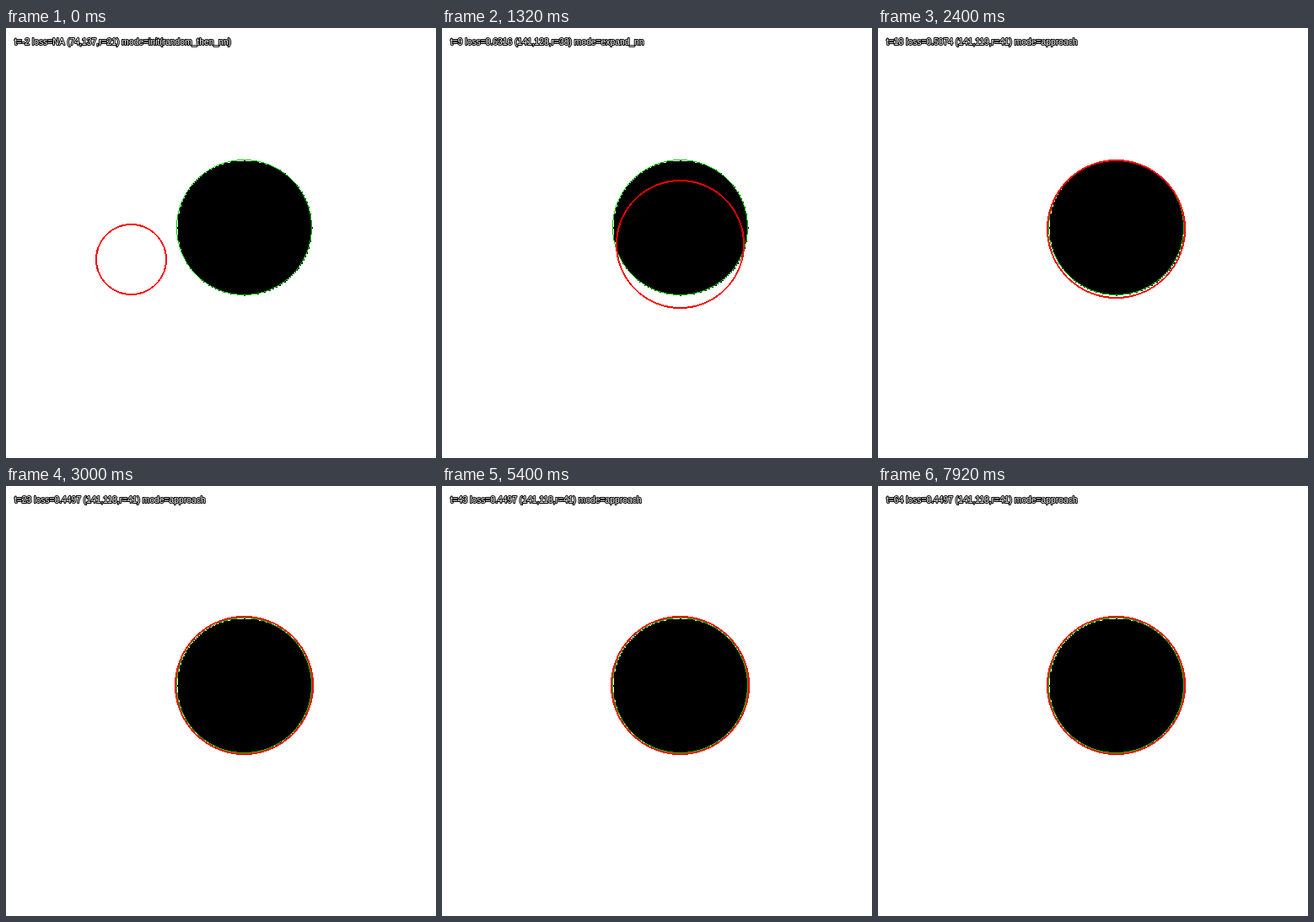
Recreate the animation shown at these times as an HTML page with a canvas. Size 510x510 px, loop 8000 ms.

```html
<!DOCTYPE html>
<html lang="en">
<head>
<meta charset="utf-8">
<title>Circle fitting</title>
<style>
  html, body { margin: 0; width: 100%; height: 100%; overflow: hidden; background: #fff; }
  canvas { display: block; width: 510px; height: 510px; }
</style>
</head>
<body>
<canvas id="stage" width="510" height="510"></canvas>
<script>
const ctx = document.getElementById('stage').getContext('2d');
const STEP = 120, LOOP = 8000, SCALE = 2;
const goal = { x: 141, y: 118, r: 40 };

// step, centre x, centre y, radius, loss
const path = [
  [-2, 74, 137, 21, 0.95],
  [4, 138, 133, 33, 0.6291],
  [7, 141, 130, 36, 0.6306],
  [14, 141, 123, 43, 0.6341],
  [15, 141, 122, 44, 0.6346],
  [19, 141, 118, 40, 0.4650],
  [20, 141, 118, 41, 0.4497]
];

function guessAt(t) {
  const next = path.findIndex(key => key[0] > t);
  if (next < 0) return path[path.length - 1].slice(1);
  const a = path[next - 1], b = path[next];
  const k = (t - a[0]) / (b[0] - a[0]);
  const [x, y, r, loss] = a.slice(1).map((v, i) => v + (b[i + 1] - v) * k);
  return [Math.round(x), Math.round(y), Math.round(r), loss];
}

// Paints every square cell around a centre whose offset passes the test
function paintCells(cx, cy, reach, cell, color, test) {
  ctx.fillStyle = color;
  for (let dy = -reach; dy <= reach; dy++) {
    for (let dx = -reach; dx <= reach; dx++) {
      if (test(dx, dy)) ctx.fillRect((cx + dx) * cell, (cy + dy) * cell, cell, cell);
    }
  }
}

function disc({ x, y, r }) {
  paintCells(x, y, r, SCALE, '#000', (dx, dy) => Math.hypot(dx, dy) <= r);
}

// Ring without antialiasing: one rounded edge pixel per step along the minor axis
function ring(x, y, r, width, color) {
  const outer = r * SCALE, inner = outer - width + 1;
  const edge = (radius, minor) => Math.round(Math.sqrt(Math.max(0, radius * radius - minor * minor)));
  paintCells(x * SCALE, y * SCALE, outer, 1, color, (dx, dy) => {
    const major = Math.max(Math.abs(dx), Math.abs(dy));
    const minor = Math.min(Math.abs(dx), Math.abs(dy));
    return major >= edge(inner, minor) && major <= edge(outer, minor);
  });
}

function label(text) {
  ctx.font = '10.3px "Liberation Sans", Arial, sans-serif';
  ctx.lineJoin = 'round';
  ctx.lineWidth = 2;
  ctx.strokeStyle = '#000';
  ctx.strokeText(text, 10, 20);
  ctx.fillStyle = '#fff';
  ctx.fillText(text, 10, 20);
}

function draw(t) {
  const [x, y, r, loss] = guessAt(t);
  const first = t === -2;
  const mode = first ? 'init(random_then_nn)' : t < 16 ? 'expand_nn' : 'approach';
  ctx.fillStyle = '#fff';
  ctx.fillRect(0, 0, 510, 510);
  disc(goal);
  ring(goal.x, goal.y, goal.r, 1, '#00c800');
  ring(x, y, r, 2, '#f00');
  label(`t=${t} loss=${first ? 'NA' : loss.toFixed(4)} (${x},${y},r=${r}) mode=${mode}`);
}

let shown;
function tick() {
  const t = Math.floor(performance.now() % LOOP / STEP) - 2;
  if (t !== shown) draw(shown = t);
  requestAnimationFrame(tick);
}
tick();
</script>
</body>
</html>
```
